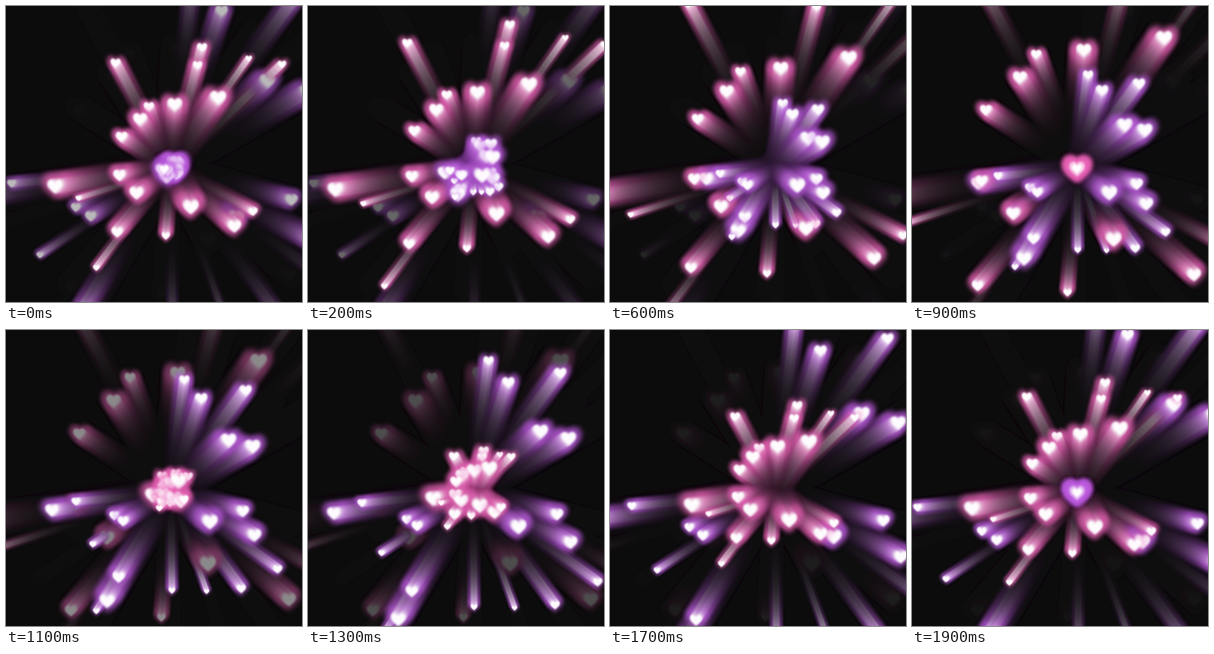
These frames come from a looping animation (400x400 px, 2 s). An HTML page with a canvas:

```html
<!DOCTYPE html>
<html lang="en">
<head>
<meta charset="utf-8">
<title>Heart bursts</title>
<style>
html, body { margin: 0; width: 100%; height: 100%; overflow: hidden; background: #0c0c0c; }
canvas { display: block; }
</style>
</head>
<body>
<canvas id="stage" width="400" height="400"></canvas>
<script>
const SIZE = 400, LOOP = 2000, STEP = 100, SUBSTEPS = 6;
const CENTER = { x: 223, y: 220 };

// Each heart: x, y after `reach` ms of flight, and the width of its white core.
const bursts = [
  {
    color: '#c062e0', start: 1915, reach: 985,
    hearts: [
      [238, 93, 15], [257, 114, 18], [307, 105, 18], [288, 161, 22], [315, 168, 22],
      [304, 241, 18], [317, 268, 20], [267, 253, 22], [343, 306, 14], [302, 328, 14],
      [263, 331, 8], [224, 330, 10], [164, 315, 18], [151, 342, 22], [139, 353, 10],
      [135, 278, 10], [159, 246, 14], [169, 252, 16], [89, 240, 20], [116, 230, 13]
    ]
  },
  {
    color: '#ec68b8', start: 932, reach: 1068,
    hearts: [
      [148, 77, 15], [193, 136, 15], [181, 153, 20], [156, 177, 17], [228, 133, 21],
      [265, 56, 15], [259, 80, 14], [328, 71, 10], [373, 79, 13], [287, 124, 23],
      [66, 244, 23], [98, 260, 9], [153, 229, 18], [176, 253, 20], [150, 306, 17],
      [122, 354, 10], [216, 311, 12], [250, 272, 22], [309, 298, 20], [334, 278, 14]
    ]
  }
];

function makeCanvas(size) {
  const canvas = document.createElement('canvas');
  canvas.width = canvas.height = size;
  return canvas;
}

const heartPath = new Path2D(
  'M0 .47C-.2 .27 -.5 .1 -.5 -.17C-.5 -.5 -.1 -.55 0 -.25C.1 -.55 .5 -.5 .5 -.17C.5 .1 .2 .27 0 .47Z');

// A white core inside a translucent blurred halo; the core spans a third of the sprite.
function makeSprite(color) {
  const canvas = makeCanvas(96), ctx = canvas.getContext('2d');
  const layer = (fill, width, blur, alpha) => {
    ctx.setTransform(width, 0, 0, width, 48, 48);
    ctx.filter = `blur(${blur}px)`;
    ctx.globalAlpha = alpha;
    ctx.fillStyle = fill;
    ctx.fill(heartPath);
  };
  layer(color, 54, 6, 0.3);
  layer('#fff', 29, 2, 0.95);
  return canvas;
}

function drawBurst(ctx, { sprite, start, reach, hearts }, time) {
  const age = (time - start + 2 * LOOP) % LOOP;
  const place = progress => {
    for (const [x, y, width] of hearts) {
      const side = width * 3;
      ctx.drawImage(sprite,
        CENTER.x + (x - CENTER.x) * progress - side / 2,
        CENTER.y + (y - CENTER.y) * progress - side / 2, side, side);
    }
  };
  place(age / reach);
  // The next burst gathers in the middle just before it flies off.
  if (age > LOOP - 65) place(0);
}

// Run two loops so that trails wrap around, keeping a picture per step.
function renderLoop() {
  const canvas = makeCanvas(SIZE), ctx = canvas.getContext('2d');
  const pictures = [];
  ctx.fillStyle = '#0c0c0c';
  ctx.fillRect(0, 0, SIZE, SIZE);
  for (let i = 0; i < 2 * LOOP / STEP * SUBSTEPS; i++) {
    const time = i * STEP / SUBSTEPS % LOOP;
    if (i % 2 === 0) {
      ctx.globalAlpha = 0.1;
      ctx.fillRect(0, 0, SIZE, SIZE);
      ctx.globalAlpha = 1;
    }
    for (const burst of bursts) drawBurst(ctx, burst, time);
    if (i % SUBSTEPS === 0) {
      const picture = makeCanvas(SIZE);
      picture.getContext('2d').drawImage(canvas, 0, 0);
      pictures[i / SUBSTEPS % (LOOP / STEP)] = picture;
    }
  }
  return pictures;
}

for (const burst of bursts) burst.sprite = makeSprite(burst.color);
const pictures = renderLoop();
const stage = document.getElementById('stage').getContext('2d');
const origin = performance.now();

function tick() {
  const elapsed = Math.max(0, performance.now() - origin);
  stage.drawImage(pictures[Math.floor(elapsed % LOOP / STEP)], 0, 0);
  requestAnimationFrame(tick);
}
tick();
</script>
</body>
</html>
```
